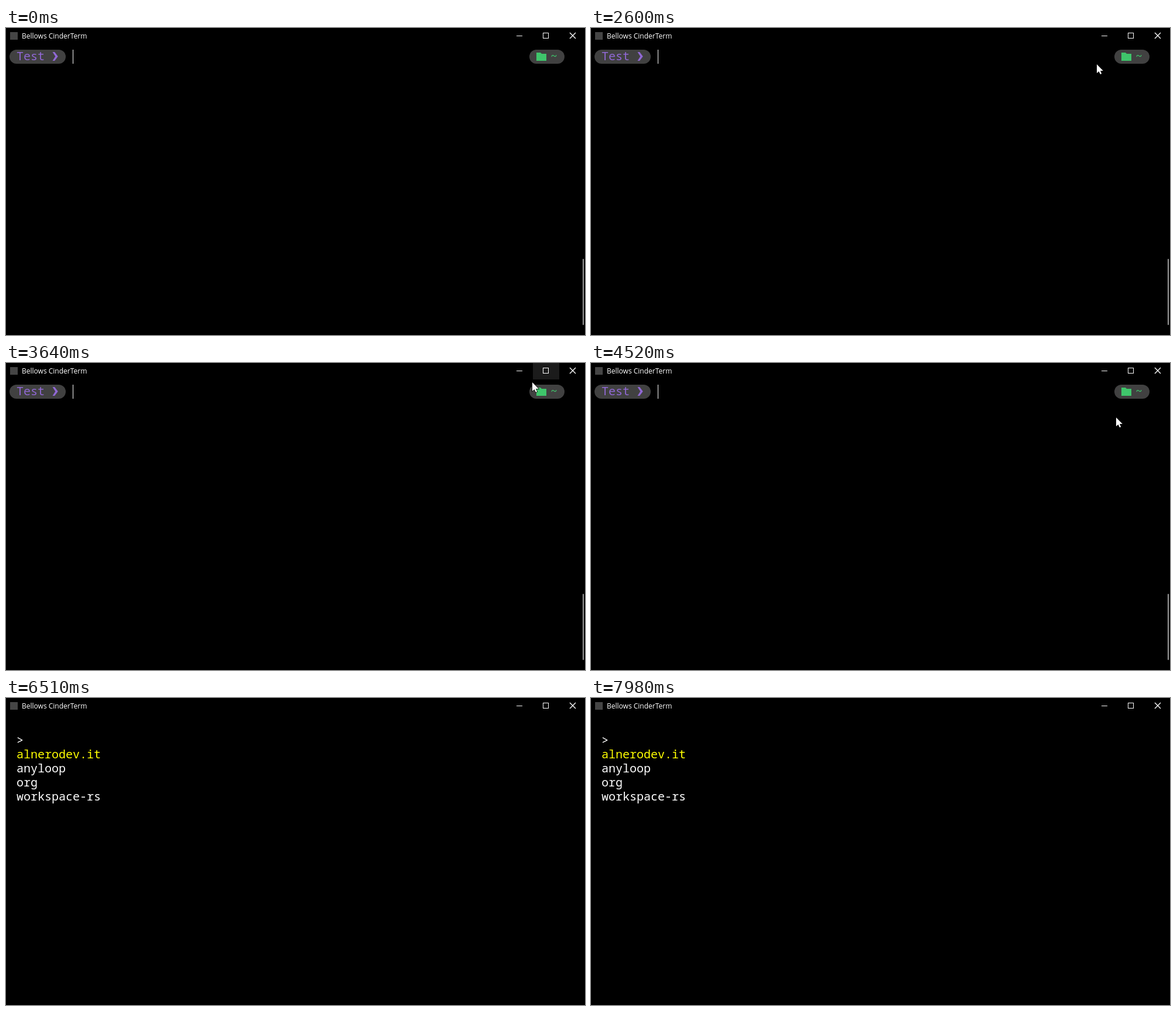
Recreate the animation shown at these times as an HTML page with a canvas. Size 989 by 524 pixels, loop 8000 ms.

```html
<!DOCTYPE html>
<html lang="en">
<head>
<meta charset="utf-8">
<title>Terminal</title>
<style>
  html, body { margin: 0; width: 100%; height: 100%; overflow: hidden; background: #000; }
  canvas { display: block; }
</style>
</head>
<body>
<canvas id="stage" width="989" height="524"></canvas>
<script>
const ctx = document.getElementById('stage').getContext('2d');
const MONO = '500 20px "Noto Sans Mono", "DejaVu Sans Mono", monospace';
const WHITE = '#fff', PILL = '#414141', PURPLE = '#9068d4', GREEN = '#3fc56b';

const LOOP = 8000, STEP = 70, BLINK = 553;
const POINTER_IN = 2320, KEY_PRESS = 6110, LIST_IN = 6510, CLEAR = 7700, REFILL = 7980;
const ROW = 24, BASELINE = 18, LEFT = 18;
const FOLDERS = ['alnerodev.it', 'anyloop', 'org', 'workspace-rs'];

// Key points of one turn around the right-hand pill: time, x, y of the tip
const TURN = [
  [2310, 902, 6], [2590, 864, 62], [2900, 910, 78], [3220, 964, 62],
  [3430, 938, 24], [3640, 899, 33], [3990, 897, 93]
];

function text(str, x, y, color, font = MONO) {
  ctx.font = font;
  ctx.fillStyle = color;
  ctx.fillText(str, x, y);
}

function rect(x, y, w, h, color) {
  ctx.fillStyle = color;
  ctx.fillRect(x, y, w, h);
}

function pill(x, y, w, h, color) {
  ctx.fillStyle = color;
  ctx.beginPath();
  ctx.roundRect(x, y, w, h, Math.min(w, h) / 2);
  ctx.fill();
}

function shape(points, x, y, color) {
  ctx.beginPath();
  points.forEach(([px, py]) => ctx.lineTo(x + px, y + py));
  ctx.closePath();
  ctx.fillStyle = color;
  ctx.fill();
}

function spline(a, b, c, d, u) {
  return b + u / 2 * (c - a + u * (2 * a - 5 * b + 4 * c - d + u * (3 * (b - c) + d - a)));
}

// The pointer moves in steps along a smooth curve, then rests
function pointerAt(t) {
  const last = TURN.length - 1;
  const time = Math.min(Math.floor(t / STEP) * STEP, TURN[last][0]);
  const next = Math.max(1, TURN.findIndex(key => key[0] >= time));
  const key = i => TURN[Math.max(0, Math.min(last, i))];
  const u = Math.max(0, (time - key(next - 1)[0]) / (key(next)[0] - key(next - 1)[0]));
  return [1, 2].map(axis =>
    Math.round(spline(...[-2, -1, 0, 1].map(k => key(next + k)[axis]), u)));
}

const pointerShown = t => t >= POINTER_IN && t < KEY_PRESS;

function drawPointer(t) {
  if (!pointerShown(t)) return;
  const [x, y] = pointerAt(t);
  ctx.strokeStyle = '#000';
  ctx.lineWidth = 1.4;
  const arrow = [[0, 0], [0, 15], [3.5, 12], [6, 17], [8.2, 16], [6, 11], [10.8, 11]];
  shape(arrow, x, y, WHITE);
  ctx.stroke();
  ctx.fill();
}

// A caption button stays lit for one step after the pointer leaves it
function drawHover(t) {
  const left = [t, t - STEP].filter(pointerShown).map(pointerAt)
    .filter(([x, y]) => y < 28 && x >= 855)
    .map(([x]) => 855 + 45 * Math.floor((x - 855) / 45))[0];
  if (left) rect(left, 0, 45, 28, '#1b1b1b');
}

function drawTitleBar(t) {
  drawHover(t);
  rect(7, 7, 13, 13, '#454545');
  text('Bellows CinderTerm', 27, 18, WHITE, '12px "Open Sans", "Noto Sans", sans-serif');

  rect(872, 13, 10, 1, WHITE);
  ctx.strokeStyle = WHITE;
  ctx.lineWidth = 1;
  ctx.strokeRect(917.5, 8.5, 9, 9);
  ctx.lineWidth = 1.4;
  ctx.beginPath();
  for (const side of [-5, 5]) {
    ctx.moveTo(968 + side, 8);
    ctx.lineTo(968 - side, 18);
  }
  ctx.stroke();
}

function drawPrompt(t) {
  const top = 37, base = top + BASELINE;
  pill(6, top, 96, ROW, PILL);
  text('Test', LEFT, base, PURPLE);
  shape([[0, 0], [3.6, 0], [9.2, 7.5], [3.6, 15], [0, 15], [4.8, 7.5]], 79.5, 41, PURPLE);

  pill(894, top, 60, ROW, PILL);
  shape([[0, 0], [7, 0], [9, 2], [17, 2], [17, 14], [0, 14]], 906, 42, GREEN);
  text('~', 930, base, GREEN);

  pill(985, 394, 2, 113, '#9c9c9c');
  const caretOn = Math.floor((t + BLINK - 649) / BLINK) % 2 === 0;
  if (t < KEY_PRESS && (t < BLINK || caretOn)) rect(114, top, 1, ROW, WHITE);
}

function drawList() {
  ['>', ...FOLDERS].forEach((line, row) =>
    text(line, LEFT, 61 + BASELINE + ROW * row, row === 1 ? '#ff0' : WHITE));
}

function draw(t) {
  rect(0, 0, 989, 524, '#000');
  drawTitleBar(t);
  if (t < LIST_IN) drawPrompt(t);
  else if (t < CLEAR || t >= REFILL) drawList();
  drawPointer(t);
}

const start = performance.now();
function frame() {
  draw((performance.now() - start) % LOOP);
  requestAnimationFrame(frame);
}
frame();
</script>
</body>
</html>
```
